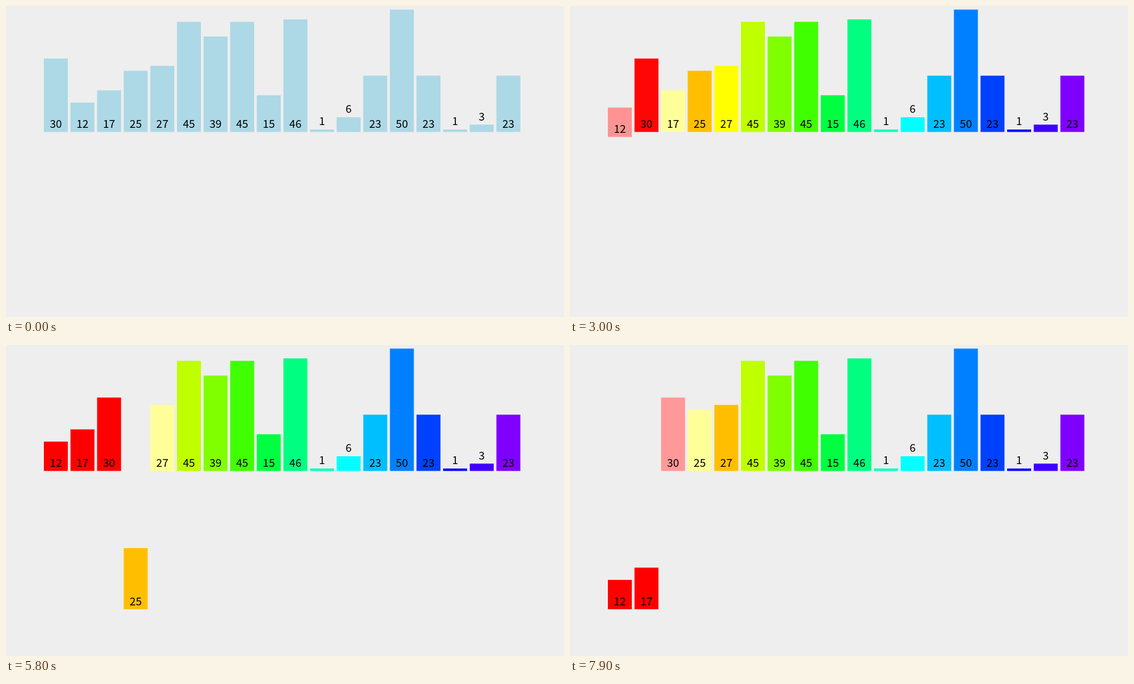
Write an HTML page that moves like this. It is 1002 px wide and 559 px high and loops after 8000 ms.

```html
<!DOCTYPE html>
<html lang="en">
<head>
<meta charset="utf-8">
<title>Merge sort</title>
<style>
  html, body { margin: 0; width: 100%; height: 100%; overflow: hidden; background: #eee; }
  svg { display: block; width: 1002px; height: 559px; }
  text {
    font: 19.6px "Noto Sans CJK SC", "Noto Sans CJK JP", "Noto Sans", sans-serif;
    text-anchor: middle;
  }
</style>
</head>
<body>
<svg viewBox="0 0 1002 559"><g id="bars"></g><g id="labels"></g></svg>
<script>
const LOOP = 8000, TICK = 100, MOVE = 250;
const LEFT = 68, PITCH = 47.8, WIDTH = 43, UNIT = 4.398, BASE = 226.4, DROP = 248.6;
const values = [30, 12, 17, 25, 27, 45, 39, 45, 15, 46, 1, 6, 23, 50, 23, 1, 3, 23];

const BLUE = [173, 216, 230], RED = [255, 0, 0], AMBER = [255, 191, 0];
const PALE_RED = [255, 153, 153], PALE_YELLOW = [255, 255, 153];

// Fully saturated colour wheel in 15 degree steps, without pure green
function rainbow(i) {
  const hue = 15 * (i > 7 ? i + 1 : i);
  return [0, 240, 120].map(shift => {
    const d = Math.abs((hue + shift + 180) % 360 - 180);
    return 255 * Math.min(1, Math.max(0, (120 - d) / 60));
  });
}

const paint = (bar, color) => ({ bar, color });
const down = (bar, slot, color) => ({ bar, slot, y: DROP, color });
const up = bar => ({ bar, y: 0 });

// Bars are named by their starting position: 0 is 30, 1 is 12, 2 is 17 ...
const steps = [
  [400, ...values.map((v, i) => paint(i, rainbow(i)))],
  [770, paint(0, PALE_RED), paint(1, PALE_YELLOW)],
  [1128, down(1, 0, RED)],
  [1491, down(0, 1, RED)],
  [1855, up(1)],
  [2220, up(0)],
  [2595, paint(1, PALE_RED), paint(2, PALE_YELLOW)],
  [2948, down(1, 0, RED), paint(0, PALE_RED)],
  [3306, down(2, 1, RED)],
  [3659, down(0, 2, RED)],
  [4032, up(1)],
  [4400, up(2)],
  [4758, up(0)],
  [5115, paint(3, PALE_RED), paint(4, PALE_YELLOW)],
  [5500, down(3, 3, AMBER)],
  [5850, down(4, 4, AMBER)],
  [6215, up(3)],
  [6568, up(4)],
  [6960, paint(1, PALE_RED), paint(3, PALE_YELLOW)],
  [7305, down(1, 0, RED), paint(2, PALE_RED)],
  [7660, down(2, 1, RED), paint(0, PALE_RED)]
];

function add(parent, tag) {
  const el = document.createElementNS("http://www.w3.org/2000/svg", tag);
  return document.getElementById(parent).appendChild(el);
}

function set(el, attrs) {
  for (const name in attrs) el.setAttribute(name, attrs[name]);
}

const views = values.map(v => {
  const height = v * UNIT;
  const rect = add("bars", "rect"), label = add("labels", "text");
  set(rect, { width: WIDTH, height });
  label.textContent = v;
  return { rect, label, height, rise: v < 10 ? height + 7.6 : 7.4 };
});

const mix = (a, b, p) => a + (b - a) * p;

function ease(t) {
  t = Math.min(1, Math.max(0, t));
  return t < 0.5 ? 4 * t ** 3 : 1 - 4 * (1 - t) ** 3;
}

function draw(time) {
  const states = values.map((v, slot) => ({ slot, y: 0, color: BLUE }));
  for (const [start, ...changes] of steps) {
    const p = ease((time - start) / MOVE);
    if (!p) continue;
    for (const { bar, slot, y, color } of changes) {
      const s = states[bar];
      if (slot !== undefined) s.slot = mix(s.slot, slot, p);
      if (y !== undefined) s.y = mix(s.y, y, p);
      if (color) s.color = s.color.map((c, i) => mix(c, color[i], p));
    }
  }
  states.forEach((s, i) => {
    const { rect, label, height, rise } = views[i];
    const x = LEFT + s.slot * PITCH, bottom = BASE + s.y;
    set(rect, { x, y: bottom - height, fill: `rgb(${s.color.map(Math.round)})` });
    set(label, { x: x + WIDTH / 2, y: bottom - rise });
  });
}

const origin = performance.now();
function frame() {
  const time = (performance.now() - origin) % LOOP;
  draw(Math.floor(time / TICK) * TICK);
  requestAnimationFrame(frame);
}
frame();
</script>
</body>
</html>
```
